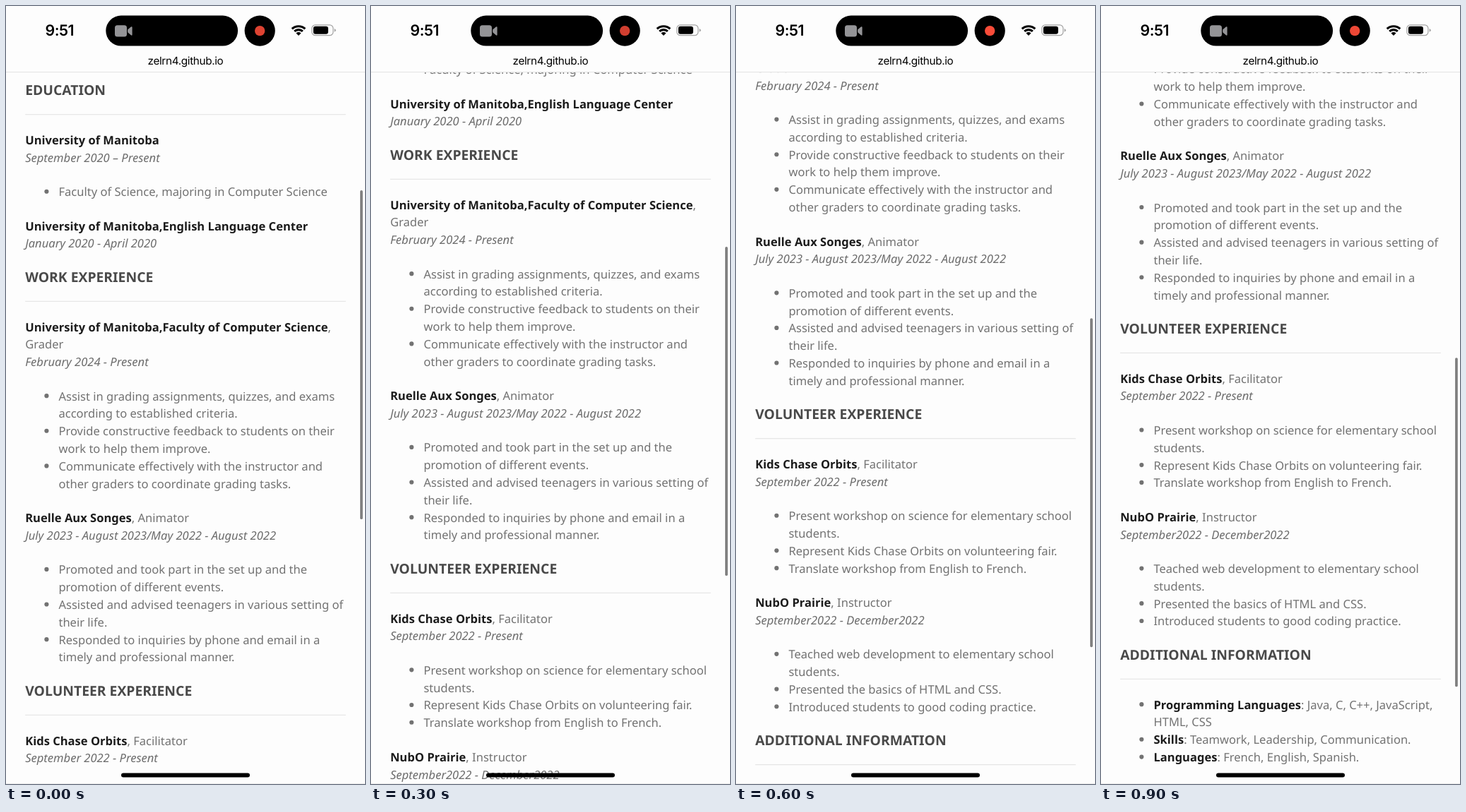
An HTML page that plays this animation: 508 px wide and 1102 px high, repeating every 1000 ms.

```html
<!DOCTYPE html>
<html lang="en">
<head>
<meta charset="utf-8">
<title>Résumé scroll</title>
<style>
  html, body { margin: 0; width: 100%; height: 100%; overflow: hidden; background: #fdfdfd; }
  svg { display: block; width: 508px; height: 1102px; }
  text { text-rendering: geometricPrecision; }
  #page text { font: 14px "Noto Sans", sans-serif; fill: #727272; }
  #page .head { font-size: 16.38px; font-weight: 700; fill: #494949; }
  #page .date { font-style: italic; fill: #6c6c6c; }
  #page .strong { font-weight: 700; fill: #1c1c1c; }
  .ui { font-family: Inter, "Liberation Sans", sans-serif; }
</style>
</head>
<body>
<svg viewBox="0 0 508 1102" xmlns="http://www.w3.org/2000/svg">
  <defs><clipPath id="view"><rect y="94" width="508" height="1008"/></clipPath></defs>
  <rect width="508" height="1102" fill="#fdfdfd"/>
  <g clip-path="url(#view)"><g id="page"></g></g>

  <rect y="93" width="508" height="1.2" fill="#e6e6e6"/>
  <rect y="1101" width="508" height="1" fill="#ececec"/>
  <rect id="bar" x="501.1" width="3.7" height="466" rx="1.85" fill="#7f7f7f"/>
  <rect x="163" y="1086.6" width="182" height="6" rx="3"/>

  <text class="ui" x="55.5" y="42.3" font-size="21.4" font-weight="600" letter-spacing="-.5">9:51</text>
  <text class="ui" x="254" y="83.2" font-size="15.3" letter-spacing="-.35" text-anchor="middle">zelrn4.github.io</text>

  <rect x="141.3" y="13.6" width="186.8" height="43" rx="21.5"/>
  <g fill="#949497">
    <rect x="154" y="27.2" width="17" height="16.4" rx="3.6"/>
    <path d="M172.2 33.6 L176.8 29.6 Q178.6 28.4 178.6 30.4 V40.4 Q178.6 42.4 176.8 41.2 L172.2 37.2 Z"/>
  </g>
  <circle cx="359.2" cy="35.1" r="21.6"/>
  <circle id="dot" cx="359.2" cy="35.1" r="7.2"/>

  <g id="wifi" fill="none" stroke="#000" stroke-width="3.1"></g>
  <rect x="432.9" y="26.8" width="30" height="14.9" rx="4.8" fill="none" stroke="#a4a4a4" stroke-width="1.2"/>
  <rect x="434.9" y="28.8" width="21" height="10.9" rx="3"/>
  <path d="M464.6 31.9 Q466.8 32.6 466.8 34.3 Q466.8 36 464.6 36.7 Z" fill="#a4a4a4"/>
</svg>
<script>
const NS = 'http://www.w3.org/2000/svg';
const $ = id => document.getElementById(id);
const SCALE = 508 / 430;          // page is laid out 430 units wide
const LEFT = 23, WIDTH = 384, GAP = 20, LINE = 21, TOP = 91.6;

function add(parent, tag, attrs, text) {
  const el = document.createElementNS(NS, tag);
  for (const k in attrs) el.setAttribute(k, attrs[k]);
  if (text) el.textContent = text;
  return parent.appendChild(el);
}

// '#' heading, '_' date, '-' list item, '+' item continued, '' gap, *strong*
const rows = `#EDUCATION
*University of Manitoba*
_September 2020 – Present

-Faculty of Science, majoring in Computer Science

*University of Manitoba,English Language Center*
_January 2020 - April 2020

#WORK EXPERIENCE
*University of Manitoba,Faculty of Computer Science*,
Grader
_February 2024 - Present

-Assist in grading assignments, quizzes, and exams
+according to established criteria.
-Provide constructive feedback to students on their
+work to help them improve.
-Communicate effectively with the instructor and
+other graders to coordinate grading tasks.

*Ruelle Aux Songes*, Animator
_July 2023 - August 2023/May 2022 - August 2022

-Promoted and took part in the set up and the
+promotion of different events.
-Assisted and advised teenagers in various setting of
+their life.
-Responded to inquiries by phone and email in a
+timely and professional manner.

#VOLUNTEER EXPERIENCE
*Kids Chase Orbits*, Facilitator
_September 2022 - Present

-Present workshop on science for elementary school
+students.
-Represent Kids Chase Orbits on volunteering fair.
-Translate workshop from English to French.

*NubO Prairie*, Instructor
_September2022 - December2022

-Teached web development to elementary school
+students.
-Presented the basics of HTML and CSS.
-Introduced students to good coding practice.

#ADDITIONAL INFORMATION
-*Programming Languages*: Java, C, C++, JavaScript,
+HTML, CSS
-*Skills*: Teamwork, Leadership, Communication.
-*Languages*: French, English, Spanish.`.split('\n');

const page = $('page');
let y = TOP;
for (const row of rows) {
  const mark = row[0], body = row.slice(1);
  if (!row) { y += GAP; continue; }
  if (mark === '#') {
    add(page, 'text', { x: LEFT, y: y + 15.3, class: 'head' }, body);
    add(page, 'rect', { x: LEFT, y: y + 18 + GAP, width: WIDTH, height: 1, fill: '#e5e5e5' });
    y += 19 + 2 * GAP;
    continue;
  }
  const inList = mark === '-' || mark === '+';
  const base = y + 15.3;
  const line = add(page, 'text', { x: inList ? LEFT + 40 : LEFT, y: base });
  if (mark === '-') add(page, 'circle', { cx: 48.6, cy: base - 5.5, r: 2.6, fill: '#727272' });
  if (mark === '_') {
    line.setAttribute('class', 'date');
    line.textContent = body;
  } else {
    (inList ? body : row).split('*').forEach((part, i) => {
      if (part) add(line, 'tspan', i % 2 ? { class: 'strong' } : {}, part);
    });
  }
  y += LINE;
}

// Wi-Fi fan: two arcs and a wedge
const fan = r => {
  const dx = r * Math.sin(.77), dy = r * Math.cos(.77);
  return `M${414 - dx} ${42 - dy} A${r} ${r} 0 0 1 ${414 + dx} ${42 - dy}`;
};
add($('wifi'), 'path', { d: fan(13.3) });
add($('wifi'), 'path', { d: fan(8.4) });
add($('wifi'), 'path', { d: fan(5) + 'L414 42Z', fill: '#000', stroke: 'none' });

// scroll distance at each tenth of a second
const scroll = [0, 52, 110.9, 173, 245.3, 325, 391.6, 442, 480.2, 512.9];

function draw(ms) {
  const step = Math.floor(ms % 1000 / 100);
  const off = scroll[step];
  page.setAttribute('transform', `translate(0 ${-off}) scale(${SCALE})`);
  $('bar').setAttribute('y', 261 + off * .4626);
  const glow = .9 + .1 * Math.cos(2 * Math.PI * (step - 7) / 10);
  $('dot').setAttribute('fill', `rgb(${[255, 77, 58].map(c => Math.round(c * glow))})`);
}

const start = performance.now();
function tick() {
  draw(performance.now() - start);
  requestAnimationFrame(tick);
}
tick();
</script>
</body>
</html>
```
